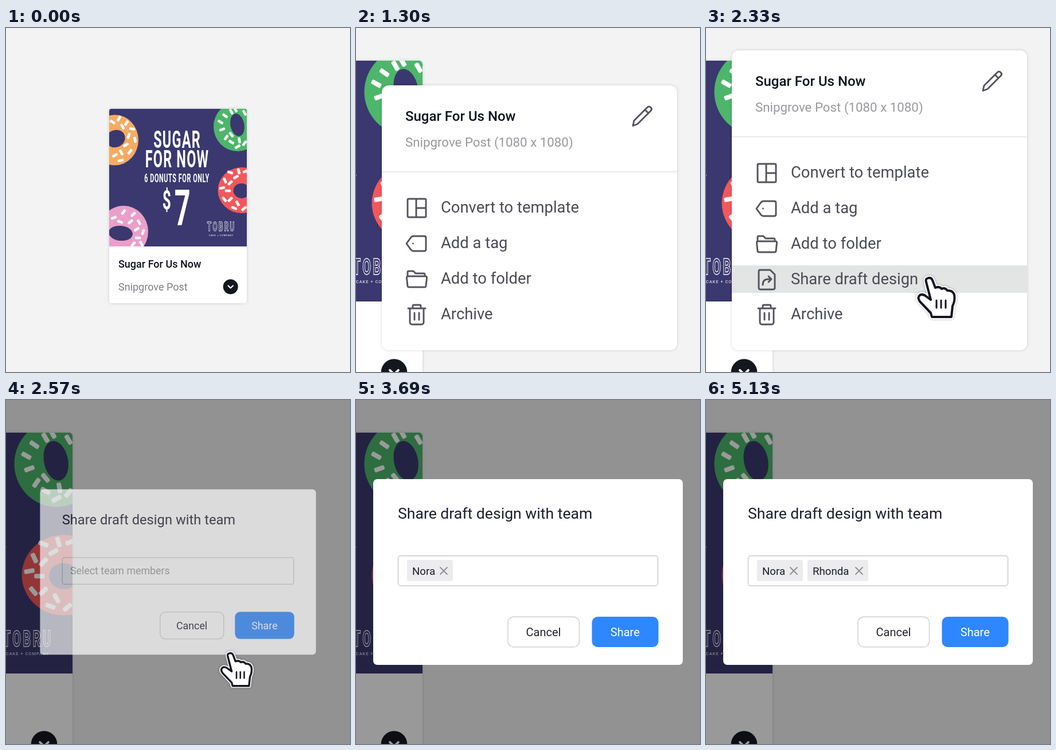
Animation, 600 px wide and 600 px high, one loop 5.63 s. Source, as an HTML page with a canvas:

```html
<!DOCTYPE html>
<html lang="en">
<head>
<meta charset="utf-8">
<title>Share a draft</title>
<style>
html, body { margin: 0; height: 100%; overflow: hidden; background: #f3f3f3 }
canvas { display: block; width: 100vw; height: 100vh }
</style>
</head>
<body>
<canvas id="stage" width="600" height="600"></canvas>
<script>
const main = document.getElementById('stage').getContext('2d');
const layer = new OffscreenCanvas(600, 600).getContext('2d');
let c = main;
const LOOP = 5630, STEP = 80;
const TITLE = 'Sugar For Us Now', KIND = 'Snipgrove Post';
const NAVY = '#3a386f', INK = '#4b4b55', DARK = '#10121d';

const clamp = v => Math.max(0, Math.min(1, v));
const smooth = v => v * v * (3 - 2 * v);
const easeOut = (v, power) => 1 - (1 - v) ** power;
// Progress in whole animation steps; lead = 1 moves on the first step already
const steps = (t, start, n, lead = 0) => clamp((Math.floor((t - start) / STEP) + lead) / n);

function group(draw) { c.save(); draw(); c.restore(); }

// Draws a group as one flat picture, so that its parts fade together
function faded(alpha, draw) {
  c = layer;
  c.clearRect(0, 0, 600, 600);
  group(draw);
  c = main;
  group(() => { c.globalAlpha = alpha; c.drawImage(layer.canvas, 0, 0); });
}

function text(s, x, y, size, color, weight = 400, align = 'left') {
  c.font = `${weight} ${size}px Roboto, sans-serif`;
  c.textAlign = align;
  c.fillStyle = color;
  c.fillText(s, x, y);
}

function box(x, y, w, h, r, fill, stroke, width = 1.4) {
  c.beginPath();
  c.roundRect(x, y, w, h, r);
  if (fill) { c.fillStyle = fill; c.fill(); }
  if (stroke) { c.strokeStyle = stroke; c.lineWidth = width; c.stroke(); }
}

function panel(x, y, w, h, r) {
  group(() => {
    c.shadowColor = 'rgba(0,0,0,.16)';
    c.shadowBlur = 5;
    box(x, y, w, h, r, '#fff');
  });
}

function line(d, color, width) {
  c.strokeStyle = color;
  c.lineWidth = width;
  c.lineCap = c.lineJoin = 'round';
  c.stroke(new Path2D(d));
}

// ---- poster card ----
// Each donut: colour, outer ellipse, hole ellipse with tilt, sprinkles as x, y, degrees
const donuts = [
  { color: '#f5ab63', ring: [190, 195.5, 41, 44], hole: [191, 193, 17, 15, -.4],
    bits: [197,158,-60, 186,164,30, 210,166,-55, 220,176,10, 203,172,60, 214,188,-70,
           225,195,80, 209,204,-30, 216,216,-50, 201,217,60, 190,222,-30, 200,231,-10] },
  { color: '#4db66a', ring: [404, 172, 42, 43], hole: [403.5, 169, 12, 20, -.2],
    bits: [400,142,60, 416,148,60, 393,146,60, 382,153,35, 374,164,30, 377,177,-20,
           384,191,-55, 393,186,50, 393,199,30, 407,196,80, 404,207,-30, 416,201,-50] },
  { color: '#f2585b', ring: [411, 283, 41.5, 40], hole: [411, 284, 14.5, 13, .1],
    bits: [391,252,20, 406,250,75, 418,250,-20, 401,260,-30, 382,266,65, 391,270,-45,
           377,279,-10, 387,284,0, 381,299,50, 391,299,-45, 404,306,60, 398,314,20, 415,315,-40] },
  { color: '#ea9fcb', ring: [205, 355, 43, 45], hole: [200, 358, 21, 13, .1],
    bits: [205,321,-50, 222,325,-40, 188,331,-20, 199,338,20, 217,338,-40, 232,339,60,
           228,351,-30, 239,356,-70, 230,366,0, 236,376,60, 222,377,-50] }
];

function donut({ color, ring, hole, bits }) {
  c.beginPath();
  c.ellipse(...ring, 0, 0, 7);
  c.fillStyle = color;
  c.fill();
  c.beginPath();
  c.ellipse(...hole, 0, 7);
  c.fillStyle = NAVY;
  c.fill();
  for (let i = 0; i < bits.length; i += 3) group(() => {
    c.translate(bits[i], bits[i + 1]);
    c.rotate(bits[i + 2] * Math.PI / 180);
    box(-5.2, -2.3, 10.4, 4.6, 1.4, '#fff');
  });
}

// Condensed display lettering
function display(s, x, y, size, outline) {
  group(() => {
    c.translate(x, y);
    c.scale(.56, 1);
    c.letterSpacing = size * (outline ? .16 : .05) + 'px';
    if (!outline) return text(s, 0, 0, size, '#fff', 700, 'center');
    c.font = `700 ${size}px Roboto, sans-serif`;
    c.textAlign = 'center';
    c.strokeStyle = '#fff';
    c.lineWidth = .9;
    c.strokeText(s, 1, 0);
  });
}

function card() {
  panel(180, 141, 240, 339, 4);
  group(() => {
    c.beginPath();
    c.roundRect(180, 141, 240, 240, [4, 4, 0, 0]);
    c.clip();
    c.fillStyle = NAVY;
    c.fillRect(180, 141, 240, 240);
    donuts.forEach(donut);
    display('SUGAR', 298.5, 209, 42);
    display('FOR NOW', 298.5, 243, 42);
    display('6 DONUTS FOR ONLY', 298, 268.5, 19.5);
    display('$', 281, 316, 47);
    display('7', 309, 344, 87);
    display('TOBRU', 375, 354, 22, true);
    c.letterSpacing = '.55px';
    text('CAKE + COMPANY', 375.3, 362.5, 4.3, '#fff', 400, 'center');
  });
  text(TITLE, 196, 418, 18, DARK, 500);
  text(KIND, 196, 458, 18, '#808086');
  c.beginPath();
  c.arc(391.7, 451.3, 13, 0, 7);
  c.fillStyle = '#15171f';
  c.fill();
  line('M387.5 449.5l4.2 4 4.2-4', '#fff', 2.2);
}

// ---- context menu ----
// Icon paths are centred on 0,0
const icons = {
  template: 'M-14-16H14Q16-16 16-14V14Q16 16 14 16H-14Q-16 16-16 14V-14Q-16-16-14-16ZM-1-16V16M-1 0H16',
  tag: 'M-18 0L-10-11Q-8-13-6-13H13Q16-13 16-10V10Q16 13 13 13H-6Q-8 13-10 11ZM-6.5 0v.1',
  folder: 'M-16-5V-12Q-16-14-14-14H-6L-2-10H12Q14-10 14-8V-5M-15-5H15Q18-5 17.5-2L16 12Q16 14 13 14H-13Q-16 14-16 12L-17.5-2Q-18-5-15-5Z',
  share: 'M-12-17H6L14-9V14Q14 17 11 17H-11Q-14 17-14 14V-14Q-14-17-12-17ZM-7 9Q-7-1 3-1H8M3-6L8-1 3 4',
  trash: 'M-15-11H15M-7-12V-15Q-7-17-5-17H5Q7-17 7-15V-12M-12-10V13Q-12 17-8 17H8Q12 17 12 13V-10M-4-3V9M4-3V9',
  pencil: 'M-16 17L-14 8 9-15Q12-18 15-15 18-12 15-9L-8 14ZM5-11L11-5'
};

function icon(name, x, y) {
  group(() => { c.translate(x, y); line(icons[name], '#53535d', 2.9); });
}

function row(name, label, y) {
  icon(name, 106, y - 8);
  text(label, 148, y, 27.4, INK);
}

function menuContent(top, grow) {
  text(TITLE, 86, top + 62, 24, DARK, 500);
  text(KIND + ' (1080 x 1080)', 86, top + 107, 22.3, '#98989e');
  icon('pencil', 499, top + 53.5);
  c.fillStyle = '#e4e4e6';
  c.fillRect(45, top + 150, 515, 1.6);
  row('template', 'Convert to template', top + 222);
  row('tag', 'Add a tag', top + 284);
  row('folder', 'Add to folder', top + 346);
  row('trash', 'Archive', top + 408 + grow);
}

function menu(open, speed, grown, hover) {
  const bottom = 562, grow = 61 * grown, top = bottom - 462 * open - grow;
  panel(45, top, 515, bottom - top, 12);
  c.beginPath();
  c.roundRect(45, top, 515, bottom - top, 12);
  c.clip();
  if (hover) {
    c.fillStyle = '#e3e5e4';
    c.fillRect(45, 414, 515, 48);
  }
  if (speed > 1) {            // vertical motion blur
    const a = c.globalAlpha;
    c.globalAlpha = a * .13;
    for (let i = -5; i <= 5; i++) menuContent(top + i * speed / 22, grow);
    c.globalAlpha = a;
  } else menuContent(top, grow);
  if (grown) {
    c.globalAlpha *= grown;
    row('share', 'Share draft design', top + 347 + grow);
  }
}

// ---- dialog ----
function tag(name, x, w) {
  box(x, 279, w, 37, 3, '#ececee');
  text(name, x + 9, 305, 18.7, '#1d1e2a');
  line(`M${x + w - 22} 292l12 12m0-12l-12 12`, '#8d8d92', 1.8);
}

function entry(t, name, start, pace, done, x, w) {
  if (t >= done) tag(name, x, w);
  else if (t >= start) text(name.slice(0, Math.floor((t - start) / pace) + 1), x, 305, 18.7, '#1d1e2a');
}

function dialog(t) {
  box(30, 138, 540, 324, 7, '#fff');
  text('Share draft design with team', 73, 206.5, 26.6, '#1d1e2e');
  box(73.5, 271.7, 453, 52.3, 4, '#fff', '#cacacc');
  if (t < 3370) text('Select team members', 89, 305, 20, '#98989c');
  entry(t, 'Nora', 3370, 80, 3690, 89, 80);
  entry(t, 'Rhonda', 3930, 107, 4570, 177, 106);
  box(265, 378.3, 124.5, 52.5, 10, '#fff', '#cfcfd2');
  text('Cancel', 327, 412, 20, '#22232e', 400, 'center');
  box(411.5, 378, 116, 53, 10, '#2e87ff');
  text('Share', 469.3, 412, 20, '#fff', 400, 'center');
}

// ---- pointer, centred on 0,0 ----
const hand = new Path2D('M-18-28Q-20-34-14-35-9-36-7-31L-2-18Q5-21 9-16 15-19 19-13 28-14 31-6 33 4 28 14L26 33H-8L-10 26-29 6Q-34-1-29-5-24-8-18-3L-10 3Z');

function pointer(x, y, size) {
  group(() => {
    c.translate(x, y);
    c.scale(size, size);
    c.lineJoin = 'round';
    group(() => {
      c.shadowColor = 'rgba(0,0,0,.3)';
      c.shadowBlur = 4;
      c.strokeStyle = '#fff';
      c.lineWidth = 8;
      c.stroke(hand);
    });
    c.fillStyle = '#fff';
    c.fill(hand);
    c.strokeStyle = '#15151f';
    c.lineWidth = 4;
    c.stroke(hand);
    line('M0 4V17M8 4V17M16 4V17', '#15151f', 3);
  });
}

function draw(t) {
  c.fillStyle = '#f3f3f3';
  c.fillRect(0, 0, 600, 600);

  const p = steps(t, 500, 8, 1), pan = 304 * easeOut(p, 3.44);
  const zoom = 1 + .75 * smooth(clamp(p * 2));
  group(() => {
    c.translate(420 - pan, 141 - 112 * (zoom - 1));
    c.scale(zoom, zoom);
    c.translate(-420, -141);
    card();
  });

  const swap = steps(t, 2330, 7), dim = clamp(swap * 7 / 3);
  if (p && dim < 1) group(() => {
    c.translate(304 - pan, 0);
    c.globalAlpha = clamp(p * 4) * (1 - dim);
    const open = easeOut(p, 3.25);
    const speed = 462 * (easeOut(Math.min(1, p + 1 / 8), 3.25) - open);
    menu(open, speed, smooth(steps(t, 1300, 7)), t >= 2020);
  });

  if (dim) {
    c.fillStyle = `rgba(0,0,0,${.4 * dim})`;
    c.fillRect(0, 0, 600, 600);
    const show = easeOut(swap, 2), size = (2 + show) / 3;
    faded(show, () => {
      c.translate(300, 300);
      c.scale(size, size);
      c.translate(-300, -300);
      dialog(t);
    });
  }

  if (t >= 1620 && t < 2970) faded(1 - steps(t, 2570, 5), () => {
    const far = (1 - steps(t, 1620, 7)) ** 2;
    pointer(402 + 70 * far, 471 + 175 * far, 1 - .16 * dim);
  });
}

function frame() {
  draw(performance.now() % LOOP);
  requestAnimationFrame(frame);
}
frame();
</script>
</body>
</html>
```
